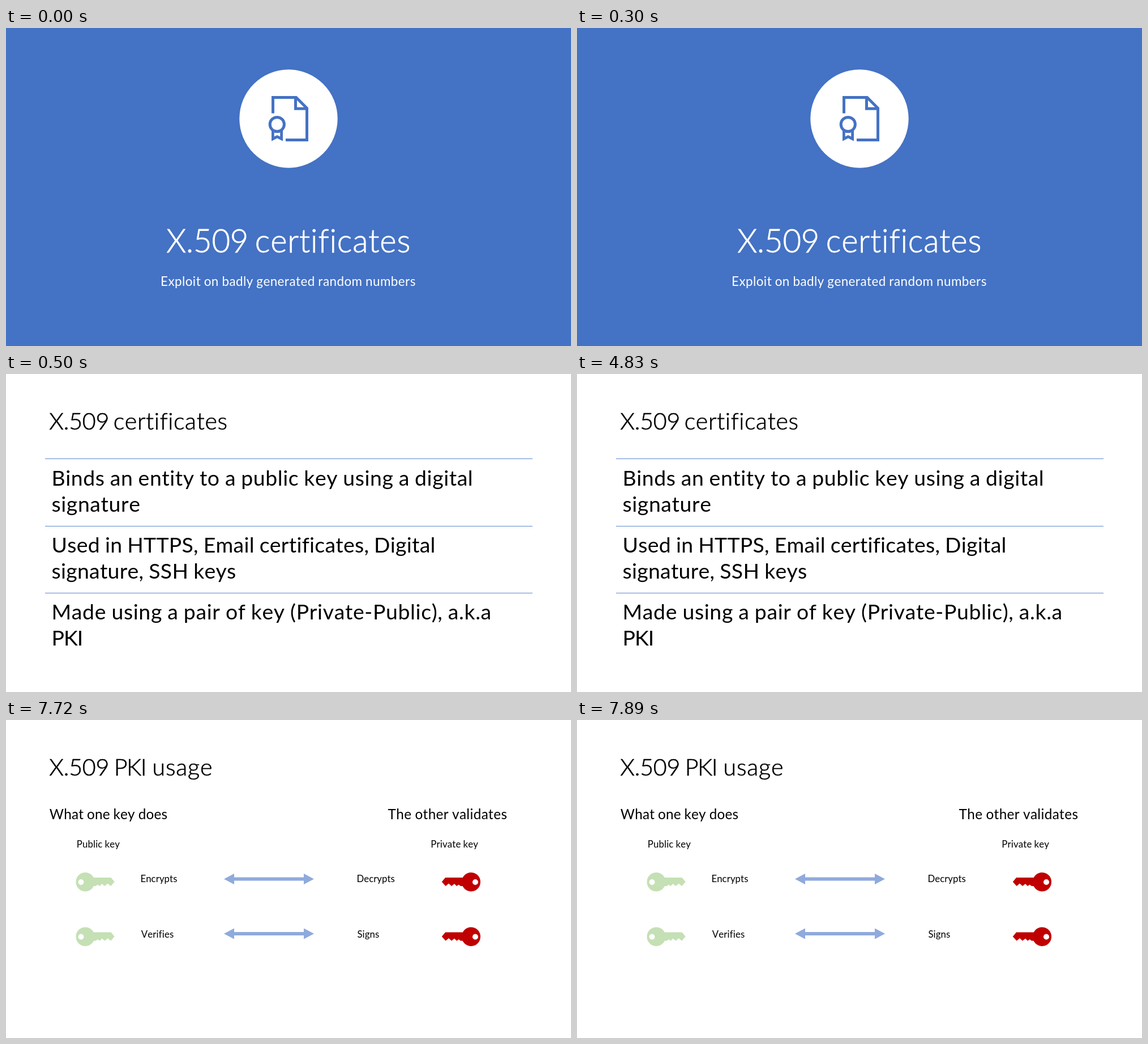
Animation of 998x561 px, one loop 8 s. Source, as an HTML page:

```html
<!DOCTYPE html>
<html lang="en">
<head>
<meta charset="utf-8">
<title>X.509 certificates</title>
<style>
  html, body { margin: 0; width: 100%; height: 100%; overflow: hidden; background: #fff; }
  svg { display: block; width: 998px; height: 561px; }
  text { font-family: Lato, "Open Sans", sans-serif; font-kerning: none; word-spacing: -0.024em; }
  .light { font-weight: 300; stroke: #000; stroke-width: 0.015em; }
  .white .light { stroke: #fff; }
  .hidden { display: none; }
</style>
</head>
<body>
<svg viewBox="0 0 998 561">
  <defs>
    <g id="key">
      <path fill-rule="evenodd" d="M123.5 286a16.5 16.5 0 0 1 31.2 -8H185.5L191.7 285.5L185 293
        L179.5 288.5L174.5 293L169.5 289L165.5 293L161.8 290.5L158.5 293H154.9A16.5 16.5 0 0 1 123.5 286Z
        M127.5 286a5 5 0 1 0 10 0a5 5 0 1 0 -10 0Z"/>
    </g>
    <path id="arrow" fill="#8faadc" d="M385 280.5l18 -9.5v6.5h123v-6.5l18 9.5l-18 9.5v-6.5h-123v6.5Z"/>
  </defs>

  <g class="slide white" fill="#fff">
    <rect width="998" height="561" fill="#4472c4"/>
    <circle cx="499" cy="160" r="86.7"/>
    <g fill="none" stroke="#4472c4" stroke-width="5">
      <path d="M471.5 150.5V122.5H512.5L531.5 141.5V197.5H494"/>
      <path d="M511.5 122.5V142.3H531.5"/>
    </g>
    <path fill="#4472c4" d="M469 180H489V199.5L479 194.5L469 199.5Z"/>
    <path d="M473.8 184Q479 186.5 484.2 184V191.5L479 189L473.8 191.5Z"/>
    <circle cx="478.8" cy="170" r="12.6" stroke="#4472c4" stroke-width="5"/>
  </g>

  <g class="slide hidden">
    <path stroke="#5f87d0" d="M69 149.5H930M69 268.5H930M69 386.5H930"/>
  </g>

  <g class="slide hidden">
    <use href="#arrow"/>
    <use href="#arrow" y="96.5"/>
    <g fill="#c5e0b4">
      <use href="#key"/>
      <use href="#key" y="96.5"/>
    </g>
    <g fill="#c00000" transform="matrix(-1 0 0 1 961.5 0)">
      <use href="#key"/>
      <use href="#key" y="96.5"/>
    </g>
  </g>
</svg>
<script>
const LOOP = 8000;
const starts = [0, 500, 7720];
const slides = [...document.querySelectorAll('.slide')];

// Each line: text, x, baseline, letter spacing
function write(slide, size, lines, cls = '') {
  for (const [str, x, y, gap = 0] of lines) {
    const el = document.createElementNS('http://www.w3.org/2000/svg', 'text');
    el.textContent = str;
    el.setAttribute('x', x);
    el.setAttribute('y', y);
    el.setAttribute('class', cls);
    el.style.fontSize = size + 'px';
    el.style.letterSpacing = gap + 'px';
    slides[slide].append(el);
  }
}

write(0, 56.2, [['X.509', 283.3, 396, -0.2], ['certificates', 439.8, 396, 0.85]], 'light');
write(0, 22.45, [['Exploit on badly generated random numbers', 273, 454.5, 0.42]]);

write(1, 41.2, [['X.509', 76.3, 97.5, -0.2], ['certificates', 189.8, 97.5, 0.62]], 'light');
write(1, 37.4, [
  ['Binds an entity to a public key using a digital', 80.5, 197, 0.57],
  ['signature', 80.5, 243, 0.6],
  ['Used in HTTPS, Email certificates, Digital', 80.5, 315, 0.27],
  ['signature, SSH keys', 80.5, 361, 0.27],
  ['Made using a pair of key (Private-Public), a.k.a', 80.5, 433, 0.65],
  ['PKI', 80.5, 479, -1]
]);

write(2, 41.2, [['X.509', 76.3, 97.5, -0.2], ['PKI', 190.8, 97.5, -1.5], ['usage', 258.5, 97.5, 0.85]], 'light');
write(2, 24.3, [
  ['What one key does', 76.8, 175, 0.2],
  ['The other validates', 674.6, 175, 0.37]
]);
write(2, 16.8, [
  ['Public key', 124.7, 224.5, 0.17],
  ['Private key', 750.2, 224.5, 0.17],
  ['Encrypts', 237.4, 286, 0.08],
  ['Decrypts', 619.6, 286],
  ['Verifies', 238.8, 383.5, 0.15],
  ['Signs', 620.4, 383.5, 0.1]
]);

function draw() {
  const t = performance.now() % LOOP;
  const current = starts.findLastIndex(start => t >= start);
  slides.forEach((slide, i) => slide.classList.toggle('hidden', i !== current));
  requestAnimationFrame(draw);
}
draw();
</script>
</body>
</html>
```
